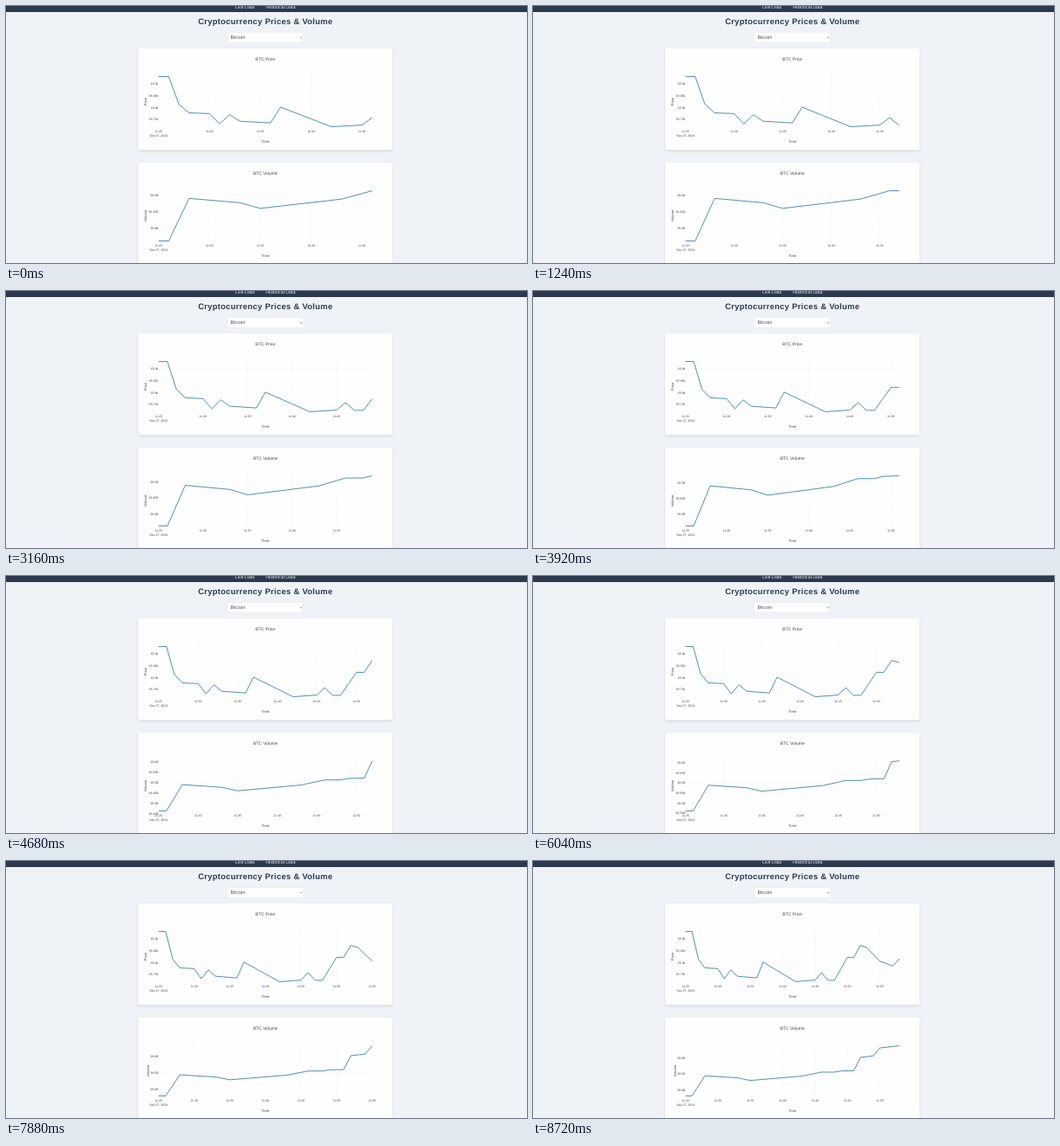
Animation, 600 px wide and 297 px high, one loop 8.76 s. Source, as an HTML page:

```html
<!DOCTYPE html>
<html lang="en">
<head>
<meta charset="utf-8">
<title>Cryptocurrency Prices &amp; Volume</title>
<style>
  html, body { margin: 0; width: 100%; height: 100%; overflow: hidden; background: #eff3f7; }
  svg { display: block; width: 600px; height: 297px; font-family: "Liberation Sans", Arial, sans-serif; text-rendering: geometricPrecision; }
  .nav { fill: #e9edf1; font-size: 5.27px; }
  .heading { fill: #2a3a50; font-size: 9.38px; font-weight: bold; letter-spacing: .31px; }
  .choice { fill: #444; font: 5.3px "Noto Sans", "Open Sans", sans-serif; }
  .card { fill: #fefefe; filter: drop-shadow(0 4px 5px rgba(0, 0, 0, .12)); }
  .chart text { fill: #444; font-size: 12px; text-anchor: middle; }
  .chart .title { font-size: 17px; }
  .chart .axis { font-size: 14px; }
  .chart .value { text-anchor: end; }
  .grid { stroke: #eee; stroke-width: 1; }
  .line { fill: none; stroke: #1a6c9f; stroke-width: 2.6; }
</style>
</head>
<body>
<svg viewBox="0 0 600 297">
  <rect width="600" height="7" fill="#2c3a4e"/>
  <text class="nav" x="264" y="3">Live Data</text>
  <text class="nav" x="299.2" y="3">Historical Data</text>
  <text class="heading" x="221.2" y="21.4">Cryptocurrency Prices &amp; Volume</text>
  <rect x="254.9" y="30.4" width="87.7" height="12" rx="1.4" fill="#fefefe" stroke="#d9dde1" stroke-width=".35"/>
  <text class="choice" x="258.5" y="38.4">Bitcoin</text>
  <path d="M338.8 36.2l1 1l1-1" fill="none" stroke="#333" stroke-width=".6"/>
  <g id="price" class="chart" transform="translate(152.2 49) scale(.293)"></g>
  <g id="volume" class="chart" transform="translate(152.2 181) scale(.293)"></g>
</svg>
<script>
const LOOP = 8760;
const plot = { left: 80, right: 920, top: 100, bottom: 320 };

// Elapsed ms and the number of data points received by then
const arrivals = [[0, 22], [40, 23], [1440, 24], [2200, 25], [3200, 26], [6800, 31], [7920, 32], [8640, 34]];

// Turning points: minute and thousandths above the base value
const charts = [
  {
    id: 'price', name: 'Price', base: 65.7, unit: 'k',
    turns: [[1, 230], [2, 114], [3, 78], [5, 75], [6, 32], [7, 70], [8, 43], [11, 36], [12, 102], [17, 20],
      [20, 27], [21, 58], [22, 26], [23, 26], [25, 122], [26, 122], [27, 172], [28, 163], [30, 106], [32, 86], [33, 116]]
  },
  {
    id: 'volume', name: 'Volume', base: 39.3, unit: 'B',
    turns: [[1, 62], [3, 190], [8, 177], [10, 160], [18, 188], [21, 213], [23, 213], [24, 220],
      [26, 222], [27, 306], [29, 316], [30, 366], [33, 380]]
  }
];

// Straight lines between key points, held flat outside them
function interpolate(keys, x) {
  const next = keys.findIndex(([keyX]) => keyX > x);
  if (next === 0) return keys[0][1];
  if (next < 0) return keys[keys.length - 1][1];
  const [x0, y0] = keys[next - 1];
  const [x1, y1] = keys[next];
  return y0 + (y1 - y0) * (x - x0) / (x1 - x0);
}

const text = (cls, x, y, content, extra = '') =>
  `<text class="${cls}" x="${x}" y="${y}" ${extra}>${content}</text>`;
const gridLine = d => `<path class="grid" d="${d}"/>`;

function clock(minutes) {
  const total = 11 * 60 + 25 + minutes;
  return `${Math.floor(total / 60)}:${String(total % 60).padStart(2, '0')}`;
}

function drawChart({ id, name, base, unit, turns }, count) {
  const shown = Array.from({ length: count }, (_, minute) => interpolate(turns, minute));
  const min = Math.min(...shown);
  const span = Math.max(...shown) - min;
  const height = plot.bottom - plot.top;
  const xAt = i => plot.left + i / (count - 1) * (plot.right - plot.left);
  const yAt = v => plot.bottom - height * (.05 + .9 * (v - min) / span);

  let grid = '';
  let labels = text('title', 500, 49, `BTC ${name}`)
    + text('axis', 500, 371.5, 'Time')
    + text('date', plot.left, 347, 'Sep 27, 2024');

  for (let i = 0; i < count; i += 5) {
    const x = xAt(i);
    if (i > 0 && i < count - 1) grid += gridLine(`M${x} ${plot.top}V${plot.bottom}`);
    labels += text('time', x, 332, clock(i));
  }

  const step = span > 280 ? 100 : 50;
  let longest = 0;
  for (let v = 0; v <= min + span * 1.1; v += step) {
    const y = yAt(v);
    if (y < plot.top || y > plot.bottom) continue;
    const label = +(base + v / 1000).toFixed(2) + unit;
    longest = Math.max(longest, label.length);
    grid += gridLine(`M${plot.left} ${y}H${plot.right}`);
    labels += text('value', plot.left - 1, y + 3.8, label);
  }

  // The axis title gives way to long tick labels
  const titleX = Math.min(42, 82 - 8 * longest);
  labels += text('axis', 0, 0, name, `transform="translate(${titleX} 210) rotate(-90)"`);

  const points = shown.map((v, i) => `${xAt(i)},${yAt(v)}`).join(' ');
  document.getElementById(id).innerHTML =
    `<rect class="card" width="1000" height="400" rx="5"/>${grid}<polyline class="line" points="${points}"/>${labels}`;
}

let current = 0;
function render(now) {
  const count = Math.floor(interpolate(arrivals, (now - start) % LOOP));
  if (count !== current) {
    current = count;
    charts.forEach(chart => drawChart(chart, count));
  }
}

function tick() {
  render(performance.now());
  requestAnimationFrame(tick);
}

const start = performance.now();
tick();
</script>
</body>
</html>
```
